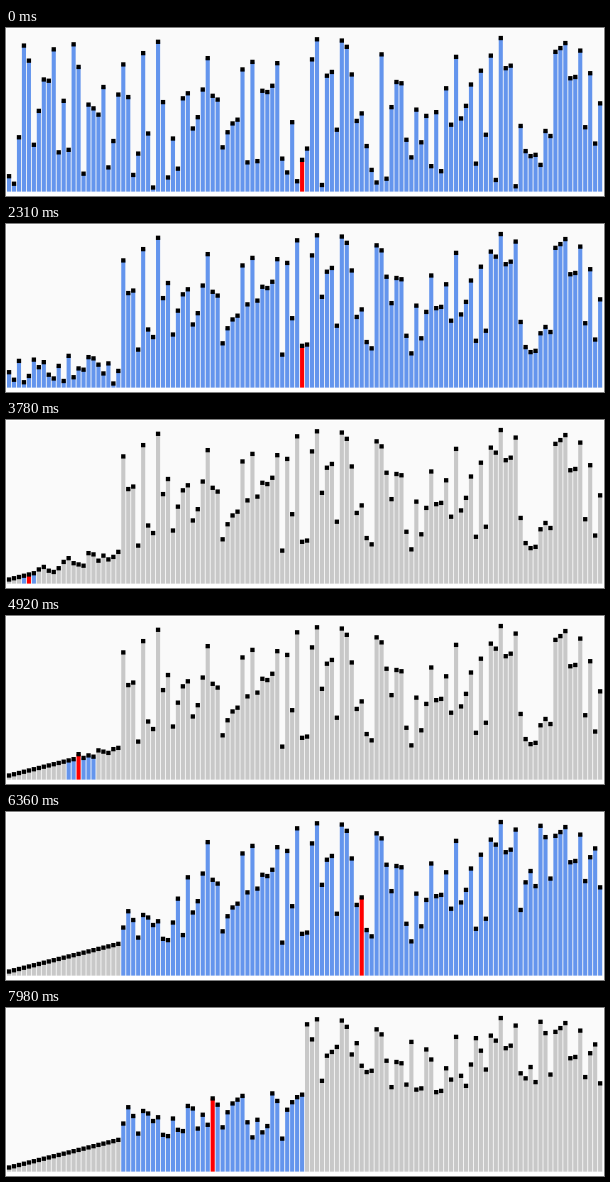
Animation of 598 by 168 pixels, one loop 8000 ms. Source, as a matplotlib script:

```python
import matplotlib.pyplot as plt
import numpy as np
from matplotlib.animation import FuncAnimation
from matplotlib.collections import PolyCollection
from matplotlib.patches import Rectangle

W, H, DPI = 598, 168, 100
LOOP, TICK = 8000, 20
LEFT, PITCH, BAR, CAP = 1.0, 4.967, 4.1, 4.3
BASE, ZERO, UNIT = 163.6, 160.76, 1.256
BLUE, GREY, RED = "#6495ed", "#c8c8c8", "#ff0000"

# ms: first swap, each swap, extra after swapping a bar with itself
START, STEP, EXTRA = 560, 96, 50

# The shuffled ranks to sort; everything else follows from them
VALUES = [
    10, 4, 41, 114, 102, 35, 62, 87, 86, 111, 29, 70, 31, 115, 97, 12, 67, 64, 59, 81,
    17, 38, 75, 99, 73, 11, 28, 108, 44, 1, 117, 69, 9, 40, 16, 72, 76, 48, 57, 79,
    104, 74, 71, 33, 45, 52, 55, 95, 21, 101, 22, 78, 77, 82, 100, 24, 13, 53, 6, 23,
    32, 103, 119, 3, 90, 93, 47, 118, 113, 91, 54, 60, 34, 15, 5, 107, 8, 65, 85, 84,
    39, 25, 63, 37, 58, 18, 61, 14, 80, 51, 105, 56, 66, 83, 20, 94, 43, 106, 7, 120,
    96, 98, 2, 50, 30, 26, 27, 19, 46, 42, 109, 112, 116, 88, 89, 110, 49, 92, 36, 68,
]
N = len(VALUES)


def quicksort(a, lo, hi):
    """Sort a in place; after every swap yield the state and the wait that follows."""
    if lo >= hi:
        return
    mid = (lo + hi) // 2
    pivot, i, j = a[mid], lo, hi
    while i <= j:
        while a[i] < pivot:
            i += 1
        while a[j] > pivot:
            j -= 1
        if i <= j:
            a[i], a[j] = a[j], a[i]
            yield (list(a), lo, hi, mid), STEP + EXTRA * (i == j)
            i, j = i + 1, j - 1
    yield from quicksort(a, lo, j)
    yield from quicksort(a, i, hi)


states = [(VALUES, 0, N - 1, (N - 1) // 2)]
starts = [START]
for state, wait in quicksort(list(VALUES), 0, N - 1):
    states.append(state)
    starts.append(starts[-1] + wait)
    if starts[-1] > LOOP:
        break

centre = LEFT + BAR / 2 + PITCH * np.arange(N)


def boxes(top, bottom, width):
    x0, x1 = centre - width / 2, centre + width / 2
    corners = [(x0, top), (x1, top), (x1, bottom), (x0, bottom)]
    return np.stack([np.column_stack(c) for c in corners], axis=1)


def layer(color):
    polys = PolyCollection([], facecolors=color, linewidths=0, snap=False)
    return ax.add_collection(polys, autolim=False)


fig = plt.figure(figsize=(W / DPI, H / DPI), dpi=DPI, facecolor="white")
ax = fig.add_axes([0, 0, 1, 1])
ax.set_xlim(0, W)
ax.set_ylim(H, 0)
ax.axis("off")
ax.add_patch(Rectangle((1, 1), W - 2, 163, facecolor="#fafafa", linewidth=0))
bars, caps = layer(BLUE), layer("black")


def draw(frame):
    now = (frame + 0.5) * TICK
    values, lo, hi, mid = states[np.searchsorted(starts, now, side="right")]
    y = ZERO - UNIT * np.array(values)
    bars.set_verts(boxes(y, np.full(N, BASE), BAR))
    caps.set_verts(boxes(y - CAP / 2, y + CAP / 2, CAP))
    colors = [BLUE if lo <= k <= hi else GREY for k in range(N)]
    colors[mid] = RED
    bars.set_facecolor(colors)
    return bars, caps


anim = FuncAnimation(fig, draw, frames=LOOP // TICK, interval=TICK,
                     init_func=lambda: draw(0), repeat=True, repeat_delay=0)
plt.show()
```
